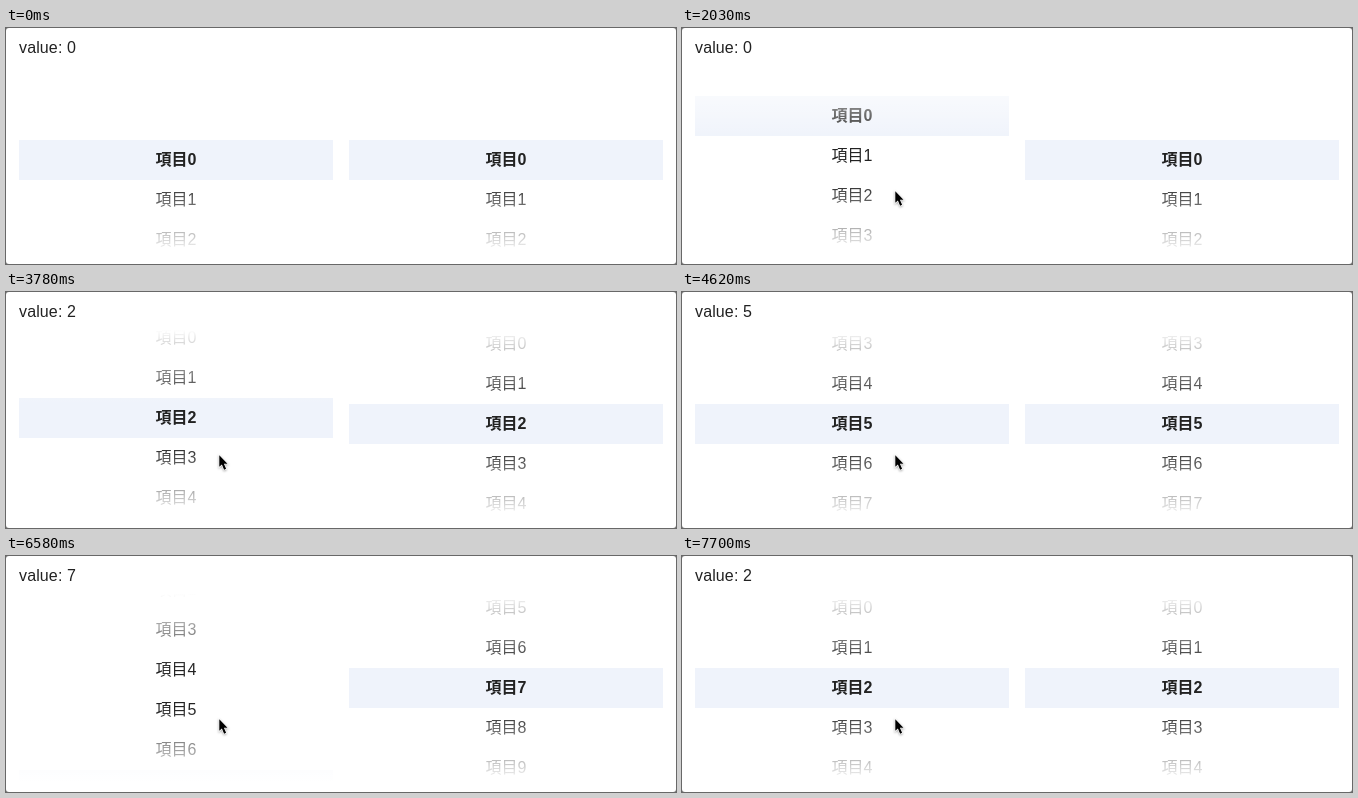
Animation of 670x236 px, one loop 8000 ms. Source, as an HTML page:

```html
<!DOCTYPE html>
<html lang="ja">
<head>
<meta charset="utf-8">
<style>
  html, body { margin: 0; width: 100%; height: 100%; overflow: hidden; background: #777; }
  #stage {
    position: relative; width: 670px; height: 236px; overflow: hidden;
    background: #fff; border-radius: 3px; color: #222;
    font: 16px/40px "Liberation Sans", "Noto Sans CJK JP", "Noto Sans CJK", sans-serif;
  }
  #label { position: absolute; left: 13px; top: 0; white-space: pre; letter-spacing: .13px; }
  .picker {
    position: absolute; top: 32px; width: 314px; height: 200px;
    overflow: hidden; text-align: center;
  }
  .picker::after {
    content: ""; position: absolute; inset: 0;
    background: linear-gradient(#fff 3%, #fff0 40%, #fff0 60%, #fff 97%);
  }
  .item { height: 40px; }
  .on { font-weight: bold; background: #eff3fb; }
  #cursor { position: absolute; left: 0; top: 0; overflow: visible; filter: drop-shadow(0 1px 1px #0005); }
</style>
</head>
<body>
<div id="stage">
  <div id="label"></div>
  <div class="picker" style="left:13px"><div class="list"></div></div>
  <div class="picker" style="left:343px"><div class="list"></div></div>
  <svg id="cursor" width="12" height="18">
    <path d="M.3 .3V11.8L2.9 9.4L5.1 14.7L7.1 13.8L4.9 8.7H8.5Z" stroke="#fff" stroke-width="1.3" paint-order="stroke"/>
  </svg>
</div>
<script>
const LOOP = 8000, TICK = 70, ROW = 40;

// Each drag: start, ticks, end offset; then the snap: start, ticks, chosen value
const drags = [
  [1750, 5, 44, 2240, 2, 1],
  [2800, 5, 82, 3290, 2, 2],
  [3780, 8, 212, 4480, 3, 5],
  [5040, 6, 290, 5530, 4, 7],
  [6090, 8, 178, 6790, 4, 4],
  [7210, 3, 92, 7560, 3, 2],
];

const smooth = p => p * p * (3 - 2 * p);
const settle = p => 1 - (1 - p) ** 4;
const mix = (a, b, p) => a + (b - a) * p;

// Progress 0..1 that advances one tick at a time
const progress = (t, start, ticks) =>
  Math.min(ticks, Math.max(0, Math.floor((t - start) / TICK) + 1)) / ticks;

const label = document.getElementById("label");
const cursor = document.getElementById("cursor");
const lists = [...document.querySelectorAll(".list")];
for (const list of lists) {
  for (let i = 0; i < 14; i++) {
    const item = document.createElement("div");
    item.className = "item";
    item.textContent = "項目" + i;
    list.append(item);
  }
}

function stateAt(t) {
  let value = 0, left = 0, right = 0;
  for (const [start, ticks, end, snapStart, snapTicks, next] of drags) {
    if (t < start) break;
    left = mix(left, end, smooth(progress(t, start, ticks)));
    if (t < snapStart) break;
    const p = settle(progress(t, snapStart, snapTicks));
    value = next;
    left = mix(left, next * ROW, p);
    right = mix(right, next * ROW, p);
  }
  return { value, offsets: [left, right] };
}

function draw(t) {
  const { value, offsets } = stateAt(t);
  label.textContent = "value: " + value;
  lists.forEach((list, n) => {
    list.style.transform = `translateY(${80 - Math.round(offsets[n])}px)`;
    [...list.children].forEach((item, i) => item.classList.toggle("on", i === value));
  });
  const away = (1 - progress(t, 840, 3)) ** 2 * 2.25;
  cursor.style.visibility = t < 840 ? "hidden" : "visible";
  cursor.style.transform = `translate(${Math.round(213 + 52 * away)}px, ${Math.round(163 + 48 * away)}px)`;
}

const begin = performance.now();
function frame() {
  draw((performance.now() - begin) % LOOP);
  requestAnimationFrame(frame);
}
draw(0);
requestAnimationFrame(frame);
</script>
</body>
</html>
```
